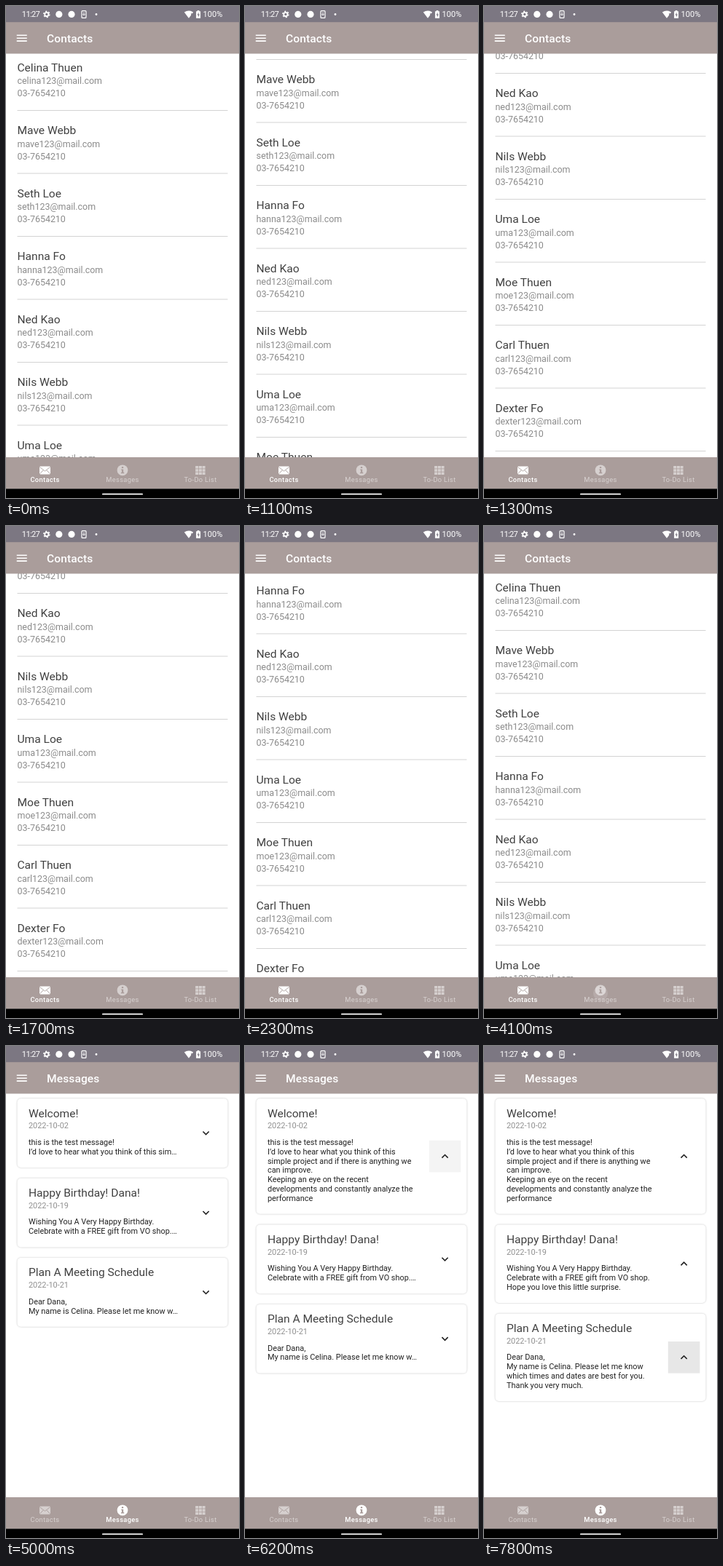
An HTML page for the animation above (8000 ms loop, 320x676 px).

```html
<!DOCTYPE html>
<html lang="en">
<head>
<meta charset="utf-8">
<title>Contacts and messages</title>
<style>
  html, body { margin: 0; width: 100%; height: 100%; overflow: hidden; background: #fff; }
  svg { display: block; width: 100%; height: 100%; font-family: Roboto, sans-serif; }
  .big { font-size: 15.56px; fill: #414141; }
  .sub { font-size: 12.44px; fill: #8b8b8b; }
  .date { font-size: 10.89px; fill: #8f8f8f; }
  .body { font-size: 10.89px; fill: #222; }
  .bar { fill: #aa9d9b; }
  .title { font-size: 15.56px; font-weight: 500; letter-spacing: .1px; fill: #fff; }
  .status { font-size: 11.1px; fill: #fff; }
  .clock { letter-spacing: -.65px; }
  .label { font-size: 9.33px; letter-spacing: .32px; text-anchor: middle; }
  .tab { fill: #fff; }
  .card { fill: #fff; filter: drop-shadow(0 .9px .8px rgba(0, 0, 0, .24)); }
</style>
</head>
<body>
<svg id="stage" viewBox="0 0 320 676">
  <rect width="320" height="676" fill="#fff"/>
  <g id="contacts"></g>
  <g id="messages"></g>

  <rect class="bar" y="22" width="320" height="43.5"/>
  <rect width="320" height="22.2" fill="#7c7782"/>
  <text class="status clock" x="21.8" y="15.4">11:27</text>
  <g fill="none" stroke="#fff">
    <circle cx="55.8" cy="11.4" r="2.6" stroke-width="1.8"/>
    <circle cx="55.8" cy="11.4" r="4.1" stroke-width="1.4" stroke-dasharray="2.1 2.194"/>
    <rect x="104" y="6.6" width="6" height="9.8" rx="1" stroke-width="1.2"/>
    <path d="M107 8.6v4M105.4 11.2l1.6 1.7 1.6-1.7" stroke-width="1"/>
  </g>
  <g fill="#fff">
    <circle cx="72.8" cy="11.4" r="4.6"/>
    <circle cx="90" cy="11.4" r="4.6"/>
    <circle cx="124" cy="11.5" r="1.4"/>
    <path d="M244.8 8.6Q251 4.4 257.2 8.6L251 16.8Z"/>
    <path d="M262.8 6h2.6v1.2h1.7v9.6h-6V7.2h1.7z"/>
  </g>
  <path d="M254.9 10v4.2M254.9 15.2v1.6" stroke="#7c7782" stroke-width="1.3"/>
  <path d="M264.6 8.8l-2 3.6h1.4v2.8l2-3.8h-1.4z" fill="#7c7782"/>
  <text class="status" x="270.6" y="15.4">100%</text>
  <path d="M3 18h18v-2H3zM3 13h18v-2H3zM3 8h18V6H3z" fill="#fff" transform="translate(12.4 34.9) scale(.778)"/>
  <text id="title" class="title" x="56" y="50"></text>

  <rect class="bar" y="620" width="320" height="43.5"/>
  <circle id="ripple" cx="160" cy="642" fill="#fff"/>
  <g class="tab">
    <rect x="46" y="632.6" width="15" height="10.8" rx="1.4"/>
    <path d="M46.4 633.6l7.1 5.4 7.1-5.4M46.6 642.6l4.6-4.8M60.4 642.6l-4.6-4.8" fill="none" stroke="#aa9d9b" stroke-width=".9"/>
    <text class="label" x="53.5" y="654.2">Contacts</text>
  </g>
  <g class="tab">
    <circle cx="160" cy="637.8" r="7.4"/>
    <path d="M158.2 636.4h3v4.4h1.1v1.4h-4.4v-1.4h1.1v-3h-.8zM158.9 632.9h2.3v2.1h-2.3z" fill="#aa9d9b"/>
    <text class="label" x="160" y="654.2">Messages</text>
  </g>
  <g class="tab">
    <path id="grid"/>
    <text class="label" x="267" y="654.2">To-Do List</text>
  </g>
  <rect y="663.3" width="320" height="13" fill="#000"/>
  <rect x="132" y="669.7" width="56" height="1.9" rx=".95" fill="#fff"/>
</svg>
<script>
const LOOP = 8000, STEP = 100;
const TOP = 65, VIEW = 555, ROW = 86.5, LINE = 12.76;
const $ = id => document.getElementById(id);

function add(parent, tag, attrs, text) {
  const el = document.createElementNS('http://www.w3.org/2000/svg', tag);
  for (const k in attrs) el.setAttribute(k, attrs[k]);
  if (text) el.textContent = text;
  return parent.appendChild(el);
}

// Linear interpolation through [time, value] points
function keys(t, points) {
  if (t <= points[0][0]) return points[0][1];
  for (let i = 1; i < points.length; i++) {
    const [a, v] = points[i - 1], [b, w] = points[i];
    if (t <= b) return v + (w - v) * (t - a) / (b - a);
  }
  return points[points.length - 1][1];
}

function easeOut(t, from, to) {
  const u = Math.min(1, Math.max(0, (t - from) / (to - from)));
  return 1 - (1 - u) ** 2;
}

const people = ['Celina Thuen', 'Mave Webb', 'Seth Loe', 'Hanna Fo', 'Ned Kao',
  'Nils Webb', 'Uma Loe', 'Moe Thuen', 'Carl Thuen', 'Dexter Fo'];
const listParts = [];
people.forEach((name, i) => {
  const put = (y, tag, attrs, text) =>
    listParts.push({ y: y + i * ROW, el: add($('contacts'), tag, attrs, text) });
  const user = name.split(' ')[0].toLowerCase();
  put(89.7, 'text', { class: 'big', x: 15.5 }, name);
  put(107.4, 'text', { class: 'sub', x: 15.5 }, user + '123@mail.com');
  put(124, 'text', { class: 'sub', x: 15.5 }, '03-7654210');
  put(143, 'rect', { x: 15.5, width: 289, height: 1, fill: '#d3d3d3' });
});

const cards = [
  { title: 'Welcome!', date: '2022-10-02', from: 5500, to: 5800, press: [5700, 6200, 7000],
    short: 'I’d love to hear what you think of this sim…',
    lines: ['this is the test message!', 'I’d love to hear what you think of this',
      'simple project and if there is anything we', 'can improve.', 'Keeping an eye on the recent',
      'developments and constantly analyze the', 'performance'] },
  { title: 'Happy Birthday! Dana!', date: '2022-10-19', from: 6900, to: 7100, press: [7100, 7600, 7600],
    short: 'Celebrate with a FREE gift from VO shop.…',
    lines: ['Wishing You A Very Happy Birthday.', 'Celebrate with a FREE gift from VO shop.',
      'Hope you love this little surprise.'] },
  { title: 'Plan A Meeting Schedule', date: '2022-10-21', from: 7500, to: 7800, press: [7700, 8000, 8000],
    short: 'My name is Celina. Please let me know w…',
    lines: ['Dear Dana,', 'My name is Celina. Please let me know',
      'which times and dates are best for you.', 'Thank you very much.'] }
];
for (const c of cards) {
  c.g = add($('messages'), 'g');
  c.box = add(c.g, 'rect', { class: 'card', x: 15.5, width: 289, rx: 5 });
  add(c.g, 'text', { class: 'big', x: 31, y: 25.4 }, c.title);
  add(c.g, 'text', { class: 'date', x: 31, y: 41.2 }, c.date);
  c.rows = c.lines.map((s, i) => add(c.g, 'text', { class: 'body', x: 31, y: 63.7 + i * LINE }, s));
  c.button = add(c.g, 'g');
  c.square = add(c.button, 'rect', { x: -21.8, y: -21.8, width: 43.6, height: 43.6 });
  c.arrow = add(c.button, 'path', { d: 'M-4.1-2.1 0 2 4.1-2.1', fill: 'none', stroke: '#222', 'stroke-width': 1.6 });
}

let grid = '';
for (let i = 0; i < 9; i++) grid += `M${260.2 + i % 3 * 4.7} ${632 + Math.floor(i / 3) * 4.2}h4v3.5h-4z`;
$('grid').setAttribute('d', grid);
const tabs = document.querySelectorAll('.tab');

function drawContacts(t) {
  const scroll = keys(t, [[1000, 0], [1100, 70], [1200, 225], [1300, 310.5],
    [2200, 310.5], [2300, 255], [2400, 95], [2500, 0]]);
  // Positive stretch pulls down from the top edge, negative up from the bottom
  const pull = keys(t, [[1300, 0], [1400, -6], [1500, -4], [1600, -1.5], [1700, 0],
    [2400, 0], [2500, 3], [2600, 7.2], [2700, 2.5], [2800, 0]]);
  for (const p of listParts) {
    const y = p.y - scroll, v = (y - TOP) / VIEW;
    const bend = pull > 0 ? 1 - (1 - v) ** 2 : 1 - v * v;
    p.el.setAttribute('y', y + (v > -.2 && v < 1.2 ? pull * bend : 0));
  }
}

function drawMessages(t) {
  let shift = 0;
  cards.forEach((c, i) => {
    const open = easeOut(t, c.from, c.to);
    const grow = open * (c.lines.length - 2) * LINE;
    const height = 94.7 + grow;
    c.g.setAttribute('transform', `translate(0 ${72.3 + i * 109.4 + shift})`);
    c.box.setAttribute('height', height);
    c.rows[1].textContent = open ? c.lines[1] : c.short;
    c.rows.forEach((row, n) => row.setAttribute('opacity', n < 2 ? 1 : open));
    c.button.setAttribute('transform', `translate(274.6 ${height / 2})`);
    c.arrow.setAttribute('transform', open ? 'scale(1 -1)' : '');
    const [on, dim, off] = c.press;
    c.square.setAttribute('fill', t < on || t >= off ? 'none' : t < dim ? '#e7e7e7' : '#f4f4f4');
    shift += grow;
  });
}

function draw(t) {
  const fade = keys(t, [[4200, 0], [4300, .3], [4400, .7], [4500, .93], [4600, 1]]);
  $('contacts').setAttribute('opacity', 1 - fade);
  $('messages').setAttribute('opacity', fade);
  $('title').textContent = fade ? 'Messages' : 'Contacts';
  [1 - fade, fade, 0].forEach((on, i) => {
    tabs[i].setAttribute('opacity', .52 + .48 * on);
    tabs[i].lastElementChild.style.fontWeight = on > .5 ? 500 : 400;
  });
  $('ripple').setAttribute('r', keys(t, [[4000, 0], [4100, 10], [4200, 18], [4300, 22]]));
  $('ripple').setAttribute('opacity', keys(t, [[4000, 0], [4100, .14], [4500, .14], [4600, .05], [4700, .05], [4800, 0]]));
  drawContacts(t);
  drawMessages(t);
}

let shown = -1;
const start = performance.now();
function tick() {
  const t = Math.floor(((performance.now() - start) % LOOP + 5) / STEP) * STEP % LOOP;
  if (t !== shown) draw(shown = t);
  requestAnimationFrame(tick);
}
tick();
</script>
</body>
</html>
```
